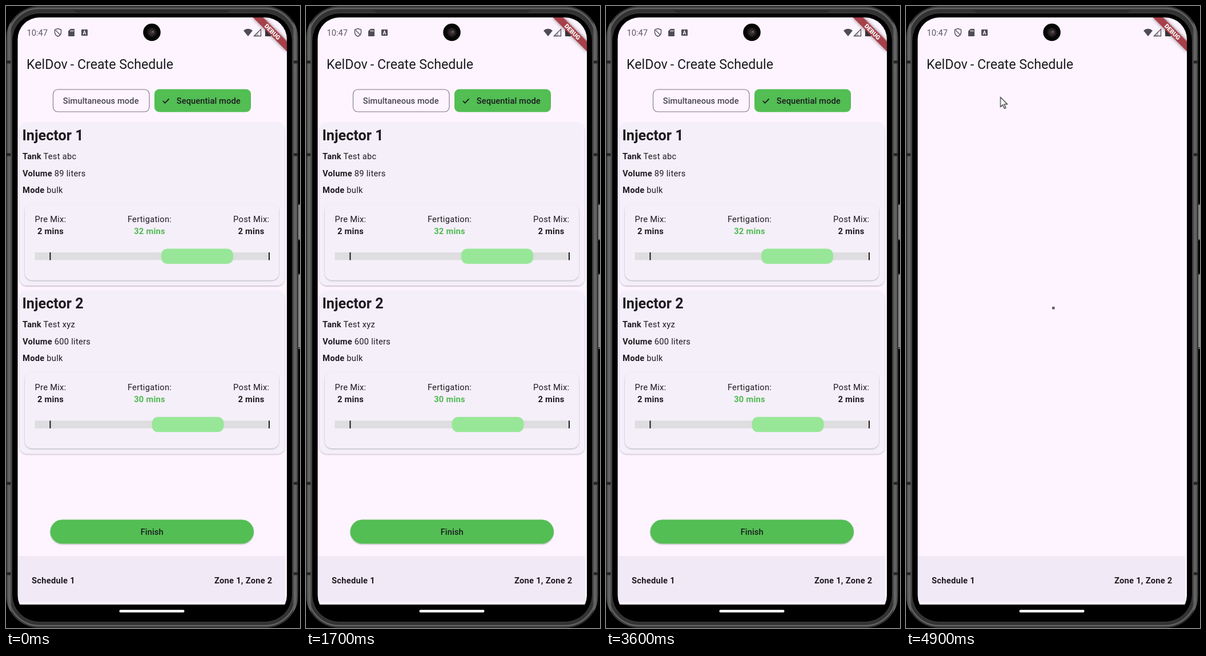
Recreate the animation shown at these times as an HTML page. Size 515 by 1088 pixels, loop 5000 ms.

```html
<!DOCTYPE html>
<html lang="en">
<head>
<meta charset="utf-8">
<title>Create Schedule</title>
<style>
  html, body { margin: 0; width: 100%; height: 100%; overflow: hidden; background: #000; }
  svg { display: block; }
  text { font: 400 14.7px Roboto, sans-serif; letter-spacing: .26px; fill: #1d1b20; white-space: pre; }
  .b { font-weight: 700; }
  .mid { text-anchor: middle; }
  .end { text-anchor: end; }
  .go { fill: #50bb50; }
  .title { font-size: 23.2px; letter-spacing: 0; }
  .head { font-size: 25.2px; font-weight: 700; letter-spacing: 0; }
  .label { font-weight: 500; letter-spacing: .1px; }
  .clock { letter-spacing: 0; fill: #5b575f; }
  .debug { font-size: 10.7px; font-weight: 900; letter-spacing: 0; fill: #fff; }

  .page, .spinner, .press, .cursor { animation: 5s infinite; }
  .page { animation-name: page; animation-timing-function: step-end; }
  .spinner { animation-name: spinner; animation-timing-function: step-end; }
  .press { opacity: 0; animation-name: press; animation-timing-function: linear; }
  .cursor { animation-name: show, move; animation-timing-function: step-end, ease-out; }

  @keyframes page { 0% { opacity: 1 } 97.8%, 100% { opacity: 0 } }
  @keyframes spinner { 0% { opacity: 0 } 97.8%, 100% { opacity: 1 } }
  @keyframes press { 0%, 91.8% { opacity: 0 } 95.8%, 100% { opacity: 1 } }
  @keyframes show {
    0% { opacity: 0 }
    23.8% { opacity: 1 }
    29.8% { opacity: 0 }
    83.8%, 100% { opacity: 1 }
  }
  @keyframes move {
    0%, 50% { transform: translate(207.5px, 247.5px) }
    50.1%, 83.8% { transform: translate(186px, 206px) }
    87.6%, 100% { transform: translate(165.5px, 159.5px) }
  }
</style>
</head>
<body>
<svg width="515" height="1088" viewBox="0 0 515 1088">
  <defs>
    <linearGradient id="rim">
      <stop offset="0" stop-color="#202020"/>
      <stop offset=".006" stop-color="#515151"/>
      <stop offset=".013" stop-color="#6a6a6a"/>
      <stop offset=".02" stop-color="#333"/>
      <stop offset=".98" stop-color="#333"/>
      <stop offset=".987" stop-color="#6a6a6a"/>
      <stop offset=".994" stop-color="#515151"/>
      <stop offset="1" stop-color="#202020"/>
    </linearGradient>
    <radialGradient id="lens">
      <stop offset="0" stop-color="#4b3d40"/>
      <stop offset=".55" stop-color="#2d2628"/>
      <stop offset="1" stop-color="#0b0b0c"/>
    </radialGradient>
    <filter id="lift" x="-5%" y="-10%" width="110%" height="125%">
      <feDropShadow dx="0" dy="1.2" stdDeviation=".8" flood-color="#000" flood-opacity=".28"/>
    </filter>
    <filter id="soft" x="-20%" y="-60%" width="140%" height="220%">
      <feDropShadow dx="0" dy="0" stdDeviation="3" flood-color="#000" flood-opacity=".5"/>
    </filter>
    <clipPath id="screen"><rect x="20.5" y="20" width="471.5" height="1049" rx="38"/></clipPath>

    <g id="card">
      <rect x="24" y="204" width="464" height="285" rx="12.6" fill="#f5effa" filter="url(#lift)"/>
      <rect x="33" y="346" width="445" height="133.5" rx="12.6" fill="#f5effa" filter="url(#lift)"/>
      <text class="b" x="29" y="327">Mode<tspan font-weight="400"> bulk</tspan></text>
      <text class="mid" x="78" y="377.5">Pre Mix:</text>
      <text class="mid" x="251.5" y="377.5">Fertigation:</text>
      <text class="mid" x="429.7" y="377.5">Post Mix:</text>
      <text class="mid b" x="78" y="398.5">2 mins</text>
      <text class="mid b" x="429.5" y="398.5">2 mins</text>
      <rect x="50.5" y="431" width="411.5" height="13.5" fill="#dedddf"/>
      <path d="M77.4 431V444.5M461 431V444.5" stroke="#19181a" stroke-width="2"/>
    </g>
    <rect id="slot" y="424.5" width="126" height="26.5" rx="10.5" fill="#98e798"/>
  </defs>

  <!-- phone body -->
  <path d="M511 346H515V410H511ZM511 468H515V600H511Z" fill="#858585"/>
  <path d="M511 347H515M511 409H515M511 469H515M511 598H515" stroke="#3b3b3b" stroke-width="2"/>
  <rect width="512" height="1088" rx="58" fill="url(#rim)"/>
  <rect x="4" y="4" width="504" height="1080" rx="54" fill="none" stroke="#626262" stroke-width="2.5"/>
  <path d="M118 7H393L387 12H124Z" fill="#292929"/>
  <path d="M0 98H8M0 260H8M0 835H8M0 993H8M504 98H512M504 260H512M504 835H512M504 993H512" stroke="#242424" stroke-width="5"/>
  <rect x="10.5" y="12.5" width="491" height="1065" rx="48" fill="#000" stroke="#3e3e3e"/>

  <g clip-path="url(#screen)">
    <path d="M20 20H492V1047H20Z" fill="#fdf4ff"/>
    <path d="M21 962H489V1042H21Z" fill="#f1e9f6"/>
    <text class="b" x="45" y="1009.5">Schedule 1</text>
    <text class="b end" x="466.5" y="1009.5">Zone 1, Zone 2</text>
    <text class="title" x="36" y="110">KelDov<tspan x="112.8">- Create Schedule</tspan></text>

    <!-- status bar -->
    <text class="clock" x="36.5" y="52">10:47</text>
    <g fill="none" stroke="#5b575f" stroke-width="1.5">
      <path d="M91 39.5L96.5 41.5V46Q96.5 51 91 53.2Q85.500 51 85.500 46V41.5Z"/>
      <path d="M87 42.500L95 50.500"/>
    </g>
    <path d="M113 40H119Q120 40 120 41V52Q120 53 119 53H110Q109 53 109 52V44Z" fill="#504c53"/>
    <path d="M113.500 42V45M115.700 42V45M117.900 42V45" stroke="#fdf4ff"/>
    <rect x="132" y="41" width="11" height="11" rx="1" fill="#504c53"/>
    <path d="M135 50L137.500 43.500L140 50M136 48H139" fill="none" stroke="#fdf4ff" stroke-width="1.200"/>
    <path d="M416 43Q424 36.500 432 43L424 53Z" fill="#504c53"/>
    <path d="M434.500 52.500L446.500 40.500V52.500Z" fill="none" stroke="#504c53" stroke-width="1.300"/>
    <path d="M434.500 52.500L442 45V52.500Z" fill="#504c53" opacity=".3"/>
    <path d="M454 41H456.500V39.500H461.500V41H464V53H454Z" fill="#3d393f"/>

    <g class="page">
      <rect x="82.500" y="146" width="168.500" height="39" rx="8.400" fill="none" stroke="#7a757f" stroke-width="1.100"/>
      <rect class="press" x="83" y="146.500" width="167.500" height="38" rx="8" fill="#d5cfd7"/>
      <text class="label" x="99.700" y="171" style="fill:#49454f">Simultaneous mode</text>
      <rect x="260" y="145.500" width="169" height="40" rx="8.400" fill="#52be53"/>
      <path d="M275 166.200L278.500 169.700L285.500 162.300" fill="none" stroke="#1d1b20" stroke-width="1.700"/>
      <text class="label" x="298.700" y="171">Sequential mode</text>

      <use href="#card"/>
      <text class="head" x="28.500" y="234.500">Injector 1</text>
      <text class="b" x="29" y="268">Tank<tspan font-weight="400"> Test abc</tspan></text>
      <text class="b" x="29" y="297.500">Volume<tspan font-weight="400"> 89 liters</tspan></text>
      <text class="mid b go" x="251.500" y="398.500">32 mins</text>
      <use href="#slot" x="272"/>

      <g transform="translate(0 294.300)">
        <use href="#card"/>
        <text class="head" x="28.500" y="234.500">Injector 2</text>
        <text class="b" x="29" y="268">Tank<tspan font-weight="400"> Test xyz</tspan></text>
        <text class="b" x="29" y="297.500">Volume<tspan font-weight="400"> 600 liters</tspan></text>
        <text class="mid b go" x="251.500" y="398.500">30 mins</text>
        <use href="#slot" x="255.500"/>
      </g>

      <rect x="77.500" y="898.500" width="356.500" height="42" rx="21" fill="#52be53" filter="url(#lift)"/>
      <text class="label mid" x="255.700" y="925">Finish</text>
    </g>

    <rect class="spinner" x="256" y="526" width="4.500" height="4.500" rx=".8" fill="#62596a"/>

    <g transform="translate(492 20) rotate(45)">
      <rect x="-42" y="29.400" width="84" height="12.600" fill="#a63f4a" filter="url(#soft)"/>
      <text class="debug mid" y="39.500">DEBUG</text>
    </g>
  </g>

  <circle cx="255.500" cy="46" r="15.300" fill="#060606"/>
  <circle cx="255.500" cy="46" r="9" fill="url(#lens)"/>
  <circle cx="257.500" cy="45" r="1.500" fill="#75666a"/>
  <rect x="198.500" y="1056.300" width="114" height="4.400" rx="2.200" fill="#fff"/>

  <path class="cursor" d="M0 0V17L4 13.300L6.800 19.800L9.400 18.700L6.700 12.300H12Z" fill="#fff" stroke="#111" stroke-width="1.100"/>
</svg>
</body>
</html>
```
